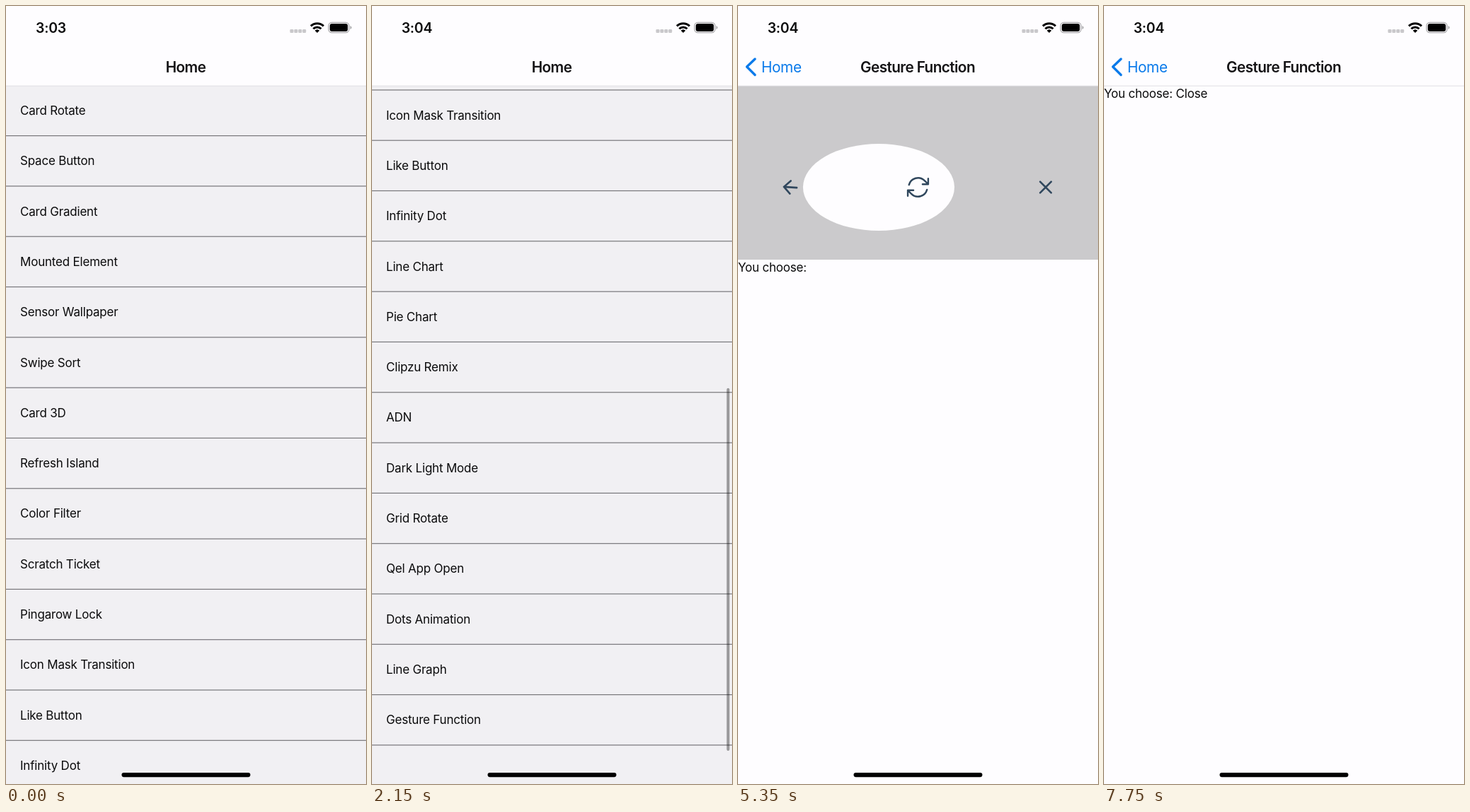
Recreate the animation shown at these times as an HTML page. Size 509 by 1101 pixels, loop 8 s.

```html
<!DOCTYPE html>
<html lang="en">
<head>
<meta charset="utf-8">
<title>Gesture Function</title>
<style>
  html, body { margin: 0; width: 100%; height: 100%; overflow: hidden; background: #fefdff; }
  svg { display: block; width: 100vw; height: 100vh; }
  text { font: 17px Inter, "Open Sans", sans-serif; letter-spacing: -.012em; fill: #0b0b0c; }
  .title { font-size: 20.8px; font-weight: 600; letter-spacing: -.03em; text-anchor: middle; fill: #151416; }
  .clock { font-size: 19.5px; font-weight: 600; letter-spacing: -.01em; text-anchor: middle; }
  .back text { font-size: 20.8px; letter-spacing: -.02em; fill: #0a7aea; }
  .back path { fill: none; stroke: #0a7aea; stroke-width: 3.4; stroke-linecap: round; stroke-linejoin: round; }
  .paper { fill: #fefdff; }
  .rule { fill: #77767a; }
  .icon { fill: none; stroke: #30475d; stroke-linecap: round; stroke-linejoin: round; }
  .wifi { fill: none; stroke: #000; stroke-width: 3; }
</style>
</head>
<body>
<svg viewBox="0 0 509 1101" preserveAspectRatio="none">
  <defs>
    <clipPath id="panelClip"><rect id="clipRect" y="113" width="509"/></clipPath>
  </defs>
  <rect class="paper" width="509" height="1101"/>

  <g id="home">
    <rect y="113" width="509" height="988" fill="#f1f0f3"/>
    <g id="rows"></g>
    <rect id="scrollbar" x="501.5" width="4" rx="2" fill="#000" opacity=".37"/>
  </g>

  <g id="detail">
    <rect class="paper" y="113" width="509" height="988"/>
    <g clip-path="url(#panelClip)">
      <rect y="113" width="509" height="250" fill="#cbcacc"/>
      <g id="actions">
        <ellipse id="blob" class="paper"/>
        <g id="arrow"><path class="icon" stroke-width="2" transform="translate(74 0) scale(1.3) translate(-12 -12)" d="M19 12H5M12 19l-7-7 7-7"/></g>
        <path class="icon" stroke-width="1.5" transform="translate(254.5 0) scale(1.6) translate(-12 -12)" d="M16.02 9.35h5M2.98 19.64v-5h5M2.98 14.65l3.18 3.18a8.25 8.25 0 0 0 13.8-3.7M4.03 9.87a8.25 8.25 0 0 1 13.8-3.7l3.18 3.18v-5"/>
        <path class="icon" stroke-width="2" transform="translate(435 0) scale(1.3) translate(-12 -12)" d="M6 6l12 12M18 6L6 18"/>
      </g>
    </g>
    <text id="choice"></text>
  </g>

  <rect class="paper" width="509" height="113"/>
  <rect y="112.6" width="509" height="1" fill="#dfdee3"/>
  <text id="homeTitle" class="title" x="254" y="94">Home</text>
  <g id="detailHeader">
    <g class="back">
      <path d="M24 75L12.5 86L24 97.5"/>
      <text x="33" y="94">Home</text>
    </g>
    <text class="title" x="254" y="94">Gesture Function</text>
  </g>

  <text id="clock" class="clock" x="63.5" y="38"></text>
  <g fill="#c9c8cb">
    <rect x="401.5" y="33" width="5" height="5" rx="1.3"/>
    <rect x="407.4" y="33" width="5" height="5" rx="1.3"/>
    <rect x="413.3" y="33" width="5" height="5" rx="1.3"/>
    <rect x="419.2" y="33" width="5" height="5" rx="1.3"/>
  </g>
  <path class="wifi" d="M431 28.4a13 13 0 0 1 18 0M434.4 32.2a8 8 0 0 1 11.2 0"/>
  <path d="M436.7 34.7a4.8 4.8 0 0 1 6.6 0L440 38z"/>
  <rect x="456" y="23.3" width="29" height="14.4" rx="4.6" fill="none" stroke="#a5a4a7" stroke-width="1.2"/>
  <rect x="457.8" y="25.1" width="25.4" height="10.8" rx="3"/>
  <path d="M486.6 28q2 .8 2 2.5t-2 2.5z" fill="#a5a4a7"/>
  <rect x="163.5" y="1085" width="182" height="6.2" rx="3.1"/>
</svg>

<script>
const LOOP = 8000, STEP = 50, WIDTH = 509, ROW = 71.31, SCROLL_END = 777, PANEL = 246;
const LABELS = ['Card Rotate', 'Space Button', 'Card Gradient', 'Mounted Element',
  'Sensor Wallpaper', 'Swipe Sort', 'Card 3D', 'Refresh Island', 'Color Filter',
  'Scratch Ticket', 'Pingarow Lock', 'Icon Mask Transition', 'Like Button', 'Infinity Dot',
  'Line Chart', 'Pie Chart', 'Clipzu Remix', 'ADN', 'Dark Light Mode', 'Grid Rotate',
  'Qel App Open', 'Dots Animation', 'Line Graph', 'Gesture Function'];

const $ = id => document.getElementById(id);
const set = (id, attrs) => {
  for (const name in attrs) $(id).setAttribute(name, attrs[name]);
};
const clamp = v => Math.min(1, Math.max(0, v));
const span = (t, start, length) => clamp((t - start) / length);
const smooth = p => p * p * (3 - 2 * p);
const easeQuad = p => p < .5 ? 2 * p * p : 1 - 2 * (1 - p) ** 2;

$('rows').innerHTML = LABELS.map((label, i) =>
  `<g id="row${i}" transform="translate(0 ${i * ROW})">
     <text x="20" y="154">${label}</text>
     <rect class="rule" y="183" width="${WIDTH}" height="1.2"/>
   </g>`).join('');
const pressedRow = 'row' + (LABELS.length - 1);

// Finger drag, then a decaying fling, then a damped bounce past the end.
function scrollAt(t) {
  if (t < 1350) return 493 * span(t, 1020, 330) ** 1.2;
  if (t < 1540) return 493 + 900 * (1 - Math.exp((1350 - t) / 500));
  if (t > 2200) return SCROLL_END;
  const past = t - 1540;
  return SCROLL_END + 1.23 * past * Math.exp(-.0112 * past);
}

function pushAt(t) {
  if (t < 2721) return 0;
  if (t > 3200) return 1;
  const x = (t - 2721) * .0182;
  return 1 - (1 + x) * Math.exp(-x);
}

const panelAt = t => PANEL * (smooth(span(t, 4150, 750)) - easeQuad(span(t, 7530, 200)));

// The leading edge of the blob runs ahead of the trailing one.
function blobEdges(t) {
  const moves = [[5188, -1, 132], [5950, 1, 140], [6588, 1, 162]];
  let left = 193, right = 316;
  for (const [start, dir, lag] of moves) {
    const lead = 180.5 * dir * smooth(span(t, start, 300));
    const trail = 180.5 * dir * smooth(span(t, start + lag, 210));
    left += dir < 0 ? lead : trail;
    right += dir < 0 ? trail : lead;
  }
  return [left, right];
}

function draw(t) {
  const scroll = scrollAt(t), push = pushAt(t), panel = panelAt(t);

  set('rows', { transform: `translate(0 ${-scroll})` });
  set('home', { transform: `translate(${-.3 * WIDTH * push} 0)` });
  set('scrollbar', {
    y: 140.5 + .514 * Math.min(scroll, SCROLL_END) + Math.max(0, scroll - SCROLL_END),
    height: 514 - Math.max(0, scroll - SCROLL_END),
    visibility: t < 1050 ? 'hidden' : 'visible'
  });
  set(pressedRow, { opacity: t < 2550 ? 1 : .78 });

  set('detail', { transform: `translate(${WIDTH * (1 - push)} 0)` });
  set('detailHeader', { opacity: push });
  set('homeTitle', { opacity: clamp(1 - 2 * push) });
  $('clock').textContent = t < 1600 ? '3:03' : '3:04';

  const [left, right] = blobEdges(t), grow = span(panel, 110, 130);
  set('clipRect', { height: panel });
  set('actions', { transform: `translate(0 ${113 + (panel + 41) / 2})` });
  set('blob', { cx: (left + right) / 2, rx: (right - left) / 2 * grow, ry: 61.5 * grow });
  set('arrow', { transform: `rotate(${4 * Math.sin(Math.PI * span(t, 5200, 320))} 74 0)` });
  set('choice', { y: 130 + panel });
  $('choice').textContent = 'You choose:' + (t < 7550 ? '' : ' Close');
}

function tick() {
  draw(Math.floor(performance.now() % LOOP / STEP) * STEP);
  requestAnimationFrame(tick);
}
tick();
</script>
</body>
</html>
```
